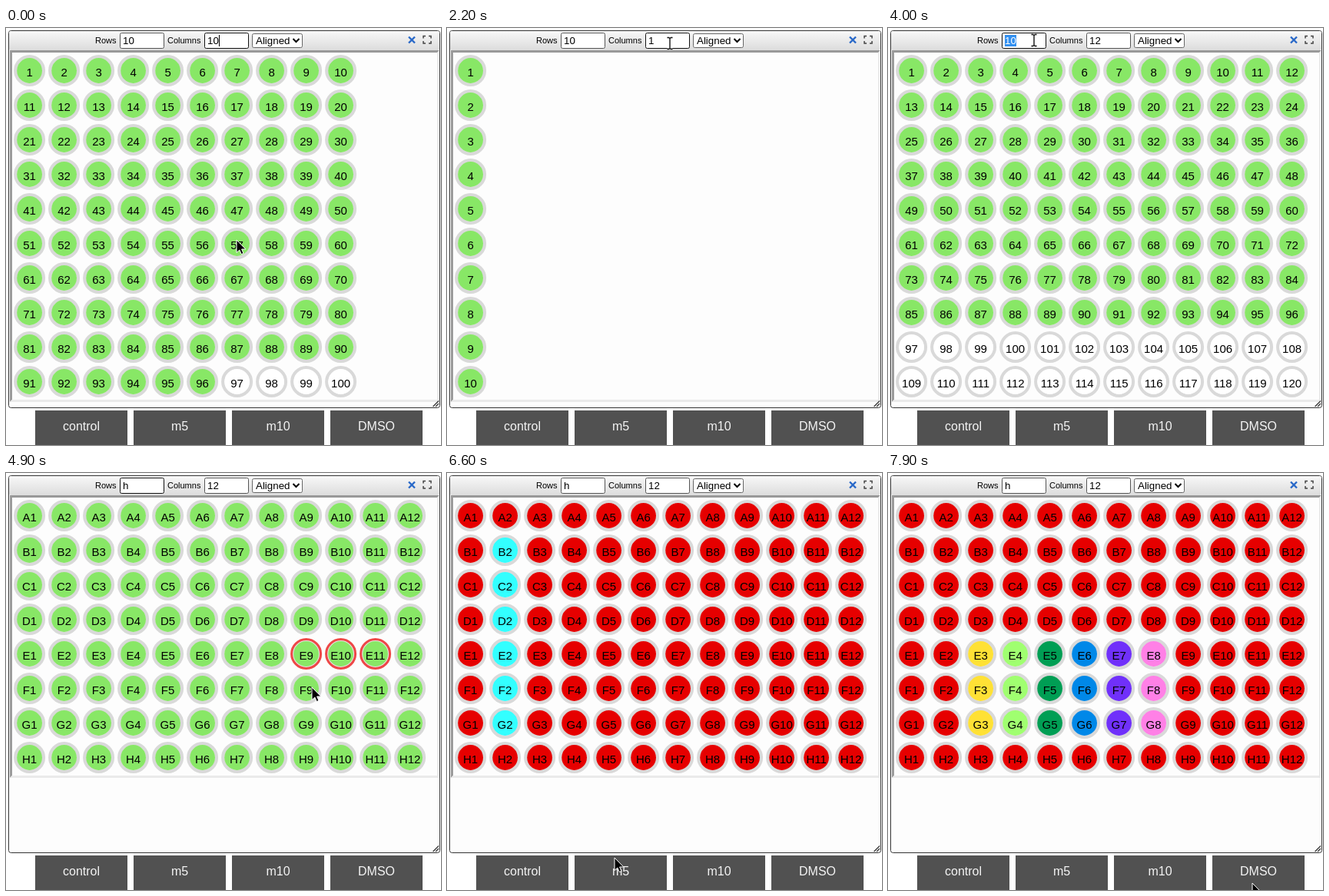
These frames come from a looping animation (566x543 px, 8 s). An HTML page:

```html
<!DOCTYPE html>
<html lang="en">
<head>
<meta charset="utf-8">
<title>Well plate editor</title>
<style>
  html, body { margin: 0; width: 100%; height: 100%; overflow: hidden; background: #fff; }
  svg { display: block; width: 566px; height: 543px; }
  text { font-family: "Liberation Sans", Arial, sans-serif; }
  .label { font-size: 11px; }
  .field { font-size: 13.333px; }
  .well { font-size: 15px; text-anchor: middle; }
  .button { font-size: 16px; text-anchor: middle; fill: #f4f4f4; }
</style>
</head>
<body>
<svg id="stage" viewBox="0 0 566 543">
  <defs>
    <linearGradient id="bar" x1="0" y1="0" x2="0" y2="1">
      <stop offset="0" stop-color="#f8f8f8"/><stop offset="1" stop-color="#dcdcdc"/>
    </linearGradient>
  </defs>
</svg>
<script>
const LOOP = 8000, STEP = 100, PITCH = 45;
const GREEN = '#88e766', RED = '#e60000', CYAN = '#33ffff';
const DOSES = ['#ffe135', '#a0ff70', '#009e54', '#0088e8', '#7030fa', '#ff80e6'];
const stage = document.getElementById('stage');

function add(tag, attrs, parent = stage, text = '') {
  const node = document.createElementNS('http://www.w3.org/2000/svg', tag);
  set(node, attrs);
  node.textContent = text;
  parent.appendChild(node);
  return node;
}
function set(node, attrs) {
  for (const key in attrs) node.setAttribute(key, attrs[key]);
}
function show(node, visible) {
  node.setAttribute('visibility', visible ? 'visible' : 'hidden');
}

// Panel and toolbar
add('rect', { x: 3.5, y: 3.5, width: 561, height: 491, rx: 3, fill: '#fdfdfd', stroke: '#333' });
add('rect', { x: 4, y: 4, width: 560, height: 25, rx: 2.5, fill: 'url(#bar)' });
add('text', { x: 116, y: 20, class: 'label' }, stage, 'Rows');
add('text', { x: 210, y: 20, class: 'label' }, stage, 'Columns');

function makeField(x) {
  const box = add('rect', { x: x + .5, y: 6.5, width: 57, height: 20, rx: 2, fill: '#fff' });
  const mark = add('rect', { x: x + 4, y: 9, width: 15, height: 15, fill: '#3390f0' });
  const text = add('text', { x: x + 4, y: 21, class: 'field' });
  const caret = add('rect', { y: 9, width: 1, height: 15 });
  return { x, box, mark, text, caret };
}
const rowsField = makeField(148), colsField = makeField(258);

function drawField(field, value, focused, selected, caretOn) {
  set(field.box, { stroke: focused ? '#111' : '#555' });
  show(field.mark, selected);
  field.text.textContent = value;
  set(field.text, { fill: selected ? '#fff' : '#000' });
  set(field.caret, { x: field.x + 4 + Math.round(value.length * 7.415) });
  show(field.caret, focused && !selected && caretOn);
}

add('rect', { x: 320.5, y: 7.5, width: 65, height: 18, rx: 2, fill: '#fff', stroke: '#666' });
add('text', { x: 325, y: 21, class: 'field' }, stage, 'Aligned');
add('path', { d: 'M373.5 14l4 4l4-4', fill: 'none', stroke: '#000', 'stroke-width': 2 });
add('path', { d: 'M524 11.5l8 8m0-8l-8 8', stroke: '#2868c8', 'stroke-width': 2.4 });
add('path', { d: 'M543 13.5v-3h3m4 0h3v3m0 3.5v3h-3m-4 0h-3v-3', fill: 'none', stroke: '#444', 'stroke-width': 1.5 });

// Inset plate frame
const frameDark = add('path', { fill: '#999' });
const frameLight = add('path', { fill: '#eaeaea' });
add('path', { d: 'M555.5 493l7.5-7.5m-4 7.5l4-4', stroke: '#333', 'stroke-width': 1.2 });

const wells = Array.from({ length: 120 }, () => {
  const group = add('g', {});
  return {
    group,
    back: add('circle', { r: 18.5, fill: '#fff' }, group),
    ring: add('circle', { fill: 'none' }, group),
    fill: add('circle', { r: 16.4 }, group),
    text: add('text', { y: 7.5, class: 'well' }, group)
  };
});

['control', 'm5', 'm10', 'DMSO'].forEach((name, i) => {
  add('rect', { x: 38 + 128 * i, y: 498, width: 120, height: 45, fill: '#515151' });
  add('text', { x: 98 + 128 * i, y: 524, class: 'button' }, stage, name);
});

const arrow = add('path', {
  d: 'M0 0V16.5L3.8 13L6.3 18.6L9 17.4L6.6 12H11.8Z', fill: '#000', stroke: '#fff', 'stroke-width': 1
});
const beam = add('g', { fill: 'none' });
const beamPath = 'M-3.5 -7.5H-1.5L0 -6.5L1.5 -7.5H3.5M0 -6.5V6.5M-3.5 7.5H-1.5L0 6.5L1.5 7.5H3.5';
add('path', { d: beamPath, stroke: '#fff', 'stroke-width': 2.6 }, beam);
add('path', { d: beamPath, stroke: '#000', 'stroke-width': 1.3 }, beam);

// Pointer stops: time, x, y
const path = [
  [0, 300, 276], [400, 300, 276], [1100, 290, 27], [1200, 290, 27], [1400, 290, 20],
  [2800, 290, 20], [3300, 190, 16], [4300, 190, 16], [4600, 500, 225], [4700, 480, 236],
  [4900, 398, 279], [5400, 98, 518], [5600, 96, 525], [6200, 98, 525], [6600, 218, 501],
  [6800, 226, 522], [7000, 226, 524], [7300, 352, 526], [7600, 354, 528], [7900, 474, 534], [8000, 474, 534]
];
function pointerAt(t) {
  const i = Math.max(1, path.findIndex(p => p[0] >= t));
  const [t0, x0, y0] = path[i - 1], [t1, x1, y1] = path[i];
  const k = (t - t0) / (t1 - t0), e = k * k * (3 - 2 * k);
  return [x0 + (x1 - x0) * e, y0 + (y1 - y0) * e];
}

const within = (v, lo, hi) => v >= lo && v <= hi;

function wellColor(t, row, col, index) {
  if (t < 5800) return index < 96 ? GREEN : '#fff';
  if (t < 6900) return col === 1 && within(row, 1, 6) ? CYAN : RED;
  const top = t < 7500 ? 1 : 4;
  return within(row, top, top + 2) && within(col, 2, 7) ? DOSES[col - 2] : RED;
}

function isHovered(t, row, col) {
  return row === 4 && (within(t, 4800, 5000) && within(col, 8, 10) || t === 4700 && within(col, 9, 11));
}

function drawPlate(t, rows, cols, lettered) {
  const b = 37 + PITCH * rows;
  set(frameDark, { d: `M5 29H564L561 32H8V${b - 3}L5 ${b}Z` });
  set(frameLight, { d: `M564 29V${b}H5L8 ${b - 3}H561V32Z` });
  wells.forEach((well, i) => {
    const row = Math.floor(i / cols), col = i % cols;
    show(well.group, row < rows);
    if (row >= rows) return;
    const hot = isHovered(t, row, col);
    set(well.group, { transform: `translate(${30.6 + PITCH * col} ${55.5 + PITCH * row})` });
    set(well.ring, hot ? { r: 19, stroke: '#ee4848', 'stroke-width': 3 }
                       : { r: 18.3, stroke: '#d9d9d9', 'stroke-width': 4.4 });
    set(well.back, { fill: hot ? '#e4e4e4' : '#fff' });
    set(well.fill, { fill: wellColor(t, row, col, i) });
    well.text.textContent = lettered ? 'ABCDEFGH'[row] + (col + 1) : i + 1;
  });
}

function render(t) {
  const lettered = t >= 4300;
  const colsText = t < 2200 ? '10' : t < 2400 ? '1' : '12';
  const focusStart = [4300, 3500, 2400, 1600, -400].find(s => t >= s);
  const caretOn = (t - focusStart) % 1000 < 500;
  drawField(rowsField, lettered ? 'h' : '10', within(t, 3500, 5300), within(t, 3700, 4299), caretOn);
  drawField(colsField, colsText, t < 3500, within(t, 1900, 2199), caretOn);
  drawPlate(t, lettered ? 8 : 10, +colsText, lettered);

  const [x, y] = pointerAt(t);
  const overField = within(t, 1300, 2800) || within(t, 3200, 4300);
  show(arrow, !overField);
  show(beam, overField);
  set(overField ? beam : arrow, { transform: `translate(${x.toFixed(1)} ${y.toFixed(1)})` });
}

const start = performance.now();
function tick() {
  const t = (performance.now() - start) % LOOP;
  render(Math.floor(t / STEP) * STEP);
  requestAnimationFrame(tick);
}
tick();
</script>
</body>
</html>
```
